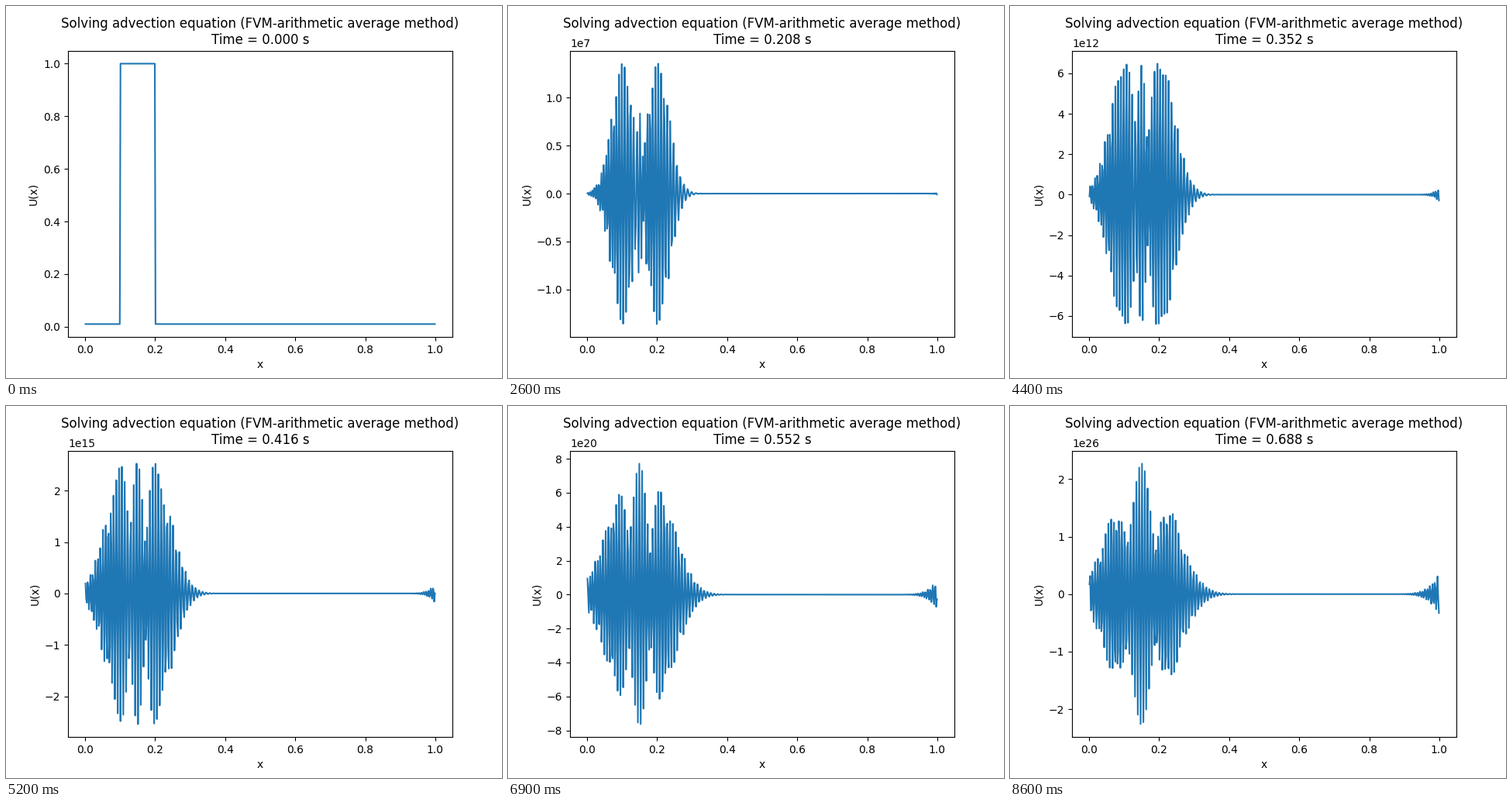
Write a matplotlib script that moves like this. It is 640 by 480 pixels and loops after 8700 ms.

```python
import numpy as np
import matplotlib.pyplot as plt
from matplotlib.animation import FuncAnimation

CELLS = 500
DX = 1 / CELLS
SPEED = 1.0
DT = 0.4 * DX / SPEED
STEPS_PER_FRAME = 10
FRAMES = 87

x = (np.arange(CELLS) + 0.5) * DX


def advance(u):
    """One explicit step with face values averaged from both neighbours."""
    right_face = 0.5 * (u + np.roll(u, -1))
    left_face = np.roll(right_face, 1)
    return u - SPEED * DT / DX * (right_face - left_face)


def solve():
    u = np.where((x > 0.1) & (x < 0.2), 1.0, 0.01)
    states = [u]
    for _ in range(FRAMES - 1):
        for _ in range(STEPS_PER_FRAME):
            u = advance(u)
        states.append(u)
    return states


states = solve()
fig, ax = plt.subplots(figsize=(6.4, 4.8), dpi=100)


def draw(i):
    ax.clear()
    ax.plot(x, states[i])
    ax.set_xlabel("x")
    ax.set_ylabel("U(x)")
    time = i * STEPS_PER_FRAME * DT
    # a fixed y keeps the title in place beside the axis exponent
    ax.set_title("Solving advection equation (FVM-arithmetic average method)\n"
                 f"Time = {time:.3f} s", y=1.0)


anim = FuncAnimation(fig, draw, frames=FRAMES, init_func=lambda: draw(0),
                     interval=100, repeat=True, repeat_delay=0)
plt.show()
```
